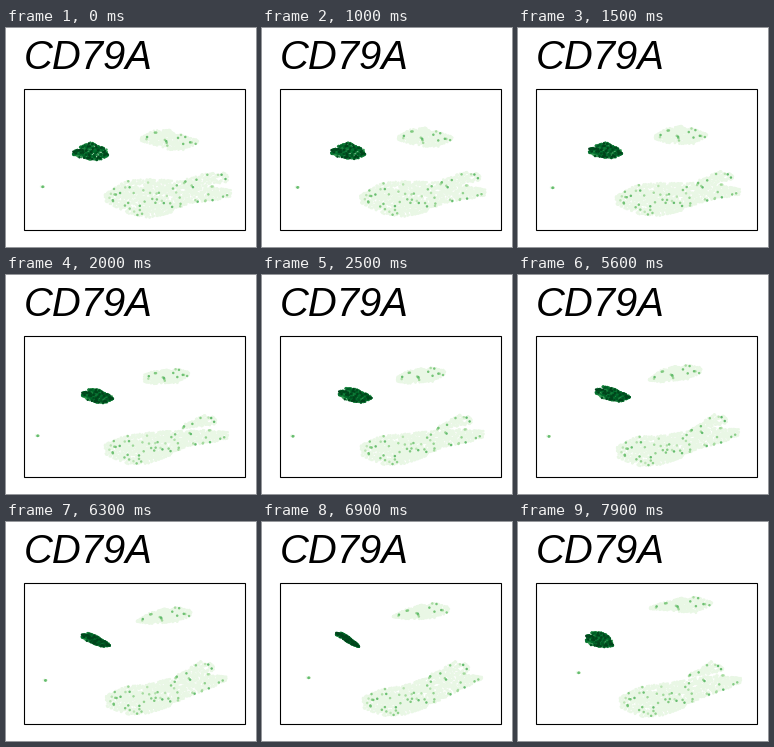
These frames come from a looping animation (250 px wide and 219 px high, 8000 ms). A matplotlib script:

```python
import numpy as np
import matplotlib.pyplot as plt
from matplotlib.animation import FuncAnimation
from matplotlib.patches import Rectangle

WIDTH, HEIGHT, DPI = 250, 219, 100
FRAMES, INTERVAL = 80, 100
PT = 72 / DPI  # points per pixel

# Each pose of a cluster: left, right, upper edge heights, lower edge heights.
B_CELLS = [
    (66, 103, [123, 117, 113, 117, 121], [128, 131, 133, 133, 129]),
    (70, 105, [120, 116, 113, 117, 122], [126, 130, 131, 131, 127]),
    (75, 108, [117, 113, 113, 117, 121], [122, 127, 129, 129, 125]),
    (77, 114, [114, 110, 112, 116, 120], [120, 126, 127, 128, 123]),
    (73, 98, [110, 110, 113, 118, 122], [114, 117, 121, 124, 126]),
    (67, 96, [113, 109, 109, 111, 119], [121, 125, 126, 126, 125]),
]
MONOCYTES = [
    (134, 193, [108, 101, 101, 107, 111], [114, 118, 123, 123, 116]),
    (136, 190, [106, 99, 97, 100, 105], [112, 116, 117, 117, 109]),
    (137, 184, [98, 95, 94, 93, 96], [108, 110, 109, 109, 101]),
    (130, 184, [104, 94, 91, 90, 92], [107, 109, 107, 106, 99]),
    (130, 188, [93, 86, 82, 80, 84], [96, 98, 98, 97, 91]),
    (131, 195, [84, 79, 75, 74, 79], [88, 89, 91, 92, 83]),
]
T_CELLS = [
    (98, 226, [165, 152, 150, 151, 153, 157, 161],
     [174, 186, 191, 187, 176, 174, 170]),
    (97, 223, [167, 156, 154, 154, 154, 155, 160],
     [177, 187, 189, 185, 176, 171, 168]),
    (98, 223, [168, 160, 157, 155, 155, 154, 156],
     [180, 190, 190, 183, 172, 169, 165]),
    (98, 222, [170, 160, 160, 157, 153, 152, 153],
     [183, 192, 191, 185, 174, 170, 162]),
    (100, 221, [174, 166, 163, 156, 152, 150, 154],
     [187, 195, 194, 188, 178, 168, 158]),
    (101, 224, [174, 164, 161, 158, 154, 152, 155],
     [186, 196, 195, 188, 177, 170, 162]),
]
NK_CELLS = [
    (177, 223, [151, 146, 144, 143], [156, 157, 157, 155]),
    (178, 216, [152, 147, 142, 145], [158, 157, 155, 152]),
    (176, 211, [149, 144, 139, 141], [154, 153, 152, 150]),
    (172, 210, [154, 146, 138, 140], [157, 155, 152, 149]),
    (166, 208, [152, 146, 138, 141], [157, 156, 154, 150]),
    (170, 206, [151, 146, 138, 144], [155, 154, 153, 149]),
]
PLATELETS = [(x - 2, x + 3, [y - 1, y - 1], [y + 2, y + 2])
             for x, y in [(36, 158), (34, 159), (31, 160),
                          (29, 161), (46, 155), (60, 150)]]

POSE_FRAMES = [4, 15, 20, 32, 55, 69, 79]
POSE_ORDER = [0, 1, 2, 3, 3, 4, 5]

rng = np.random.default_rng(7)


def place(pose, along, across):
    """Map unit coordinates into the outline of one pose."""
    left, right, top, bottom = pose
    nodes = np.linspace(0, 1, len(top))
    upper = np.interp(along, nodes, top) + 0.9
    lower = np.interp(along, nodes, bottom) - 0.9
    x = left + 1 + along * (right - left - 2)
    return np.column_stack([x, upper + across * (lower - upper)])


def scatter_cells(poses, count):
    """Spread cells evenly over the first outline and follow every pose."""
    _, _, top, bottom = poses[0]
    grid = np.linspace(0, 1, 200)
    heights = np.interp(grid, np.linspace(0, 1, len(top)),
                        np.subtract(bottom, top))
    share = np.cumsum(heights)
    along = np.interp((np.arange(count) + rng.random(count)) / count,
                      share / share[-1], grid)
    across = rng.random(count)
    return np.array([place(pose, along, across) for pose in poses])


def sparse_levels(count, fraction):
    expressed = rng.random(count) < fraction
    return np.where(expressed, rng.uniform(0.28, 0.55, count), 0.1)


parts = [
    (T_CELLS, 1450, 0.035),
    (NK_CELLS, 150, 0.05),
    (MONOCYTES, 480, 0.025),
    (PLATELETS, 5, 0.4),
]
tracks = [scatter_cells(poses, count) for poses, count, _ in parts]
levels = [sparse_levels(count, fraction) for _, count, fraction in parts]
tracks.append(scatter_cells(B_CELLS, 340))
levels.append(np.clip(rng.normal(0.82, 0.13, 340), 0.35, 1))

levels = np.concatenate(levels)
order = np.argsort(levels, kind="stable")
tracks = np.concatenate(tracks, axis=1)[:, order]

fig = plt.figure(figsize=(WIDTH / DPI, HEIGHT / DPI), dpi=DPI, facecolor="white")
ax = fig.add_axes([0, 0, 1, 1])
ax.set(xlim=(0, WIDTH), ylim=(HEIGHT, 0))
ax.axis("off")
ax.text(17.5, 41, "CD79A", family="Liberation Sans", style="italic",
        size=40 * PT, color="black", va="baseline")
ax.add_patch(Rectangle((17.5, 60.5), 221, 141, fill=False,
                       edgecolor="black", linewidth=1.1 * PT))
cells = ax.scatter(*tracks[0].T, s=(2.5 * PT) ** 2, linewidths=0,
                   c=plt.cm.Greens(levels[order]))


def update(frame):
    moment = np.interp(frame, POSE_FRAMES, range(len(POSE_FRAMES)))
    index = min(int(moment), len(POSE_FRAMES) - 2)
    blend = moment - index
    start, end = (tracks[POSE_ORDER[index + step]] for step in (0, 1))
    cells.set_offsets(start + blend * (end - start))
    return [cells]


animation = FuncAnimation(fig, update, frames=FRAMES, interval=INTERVAL,
                          repeat=True, repeat_delay=0)
plt.show()
```
